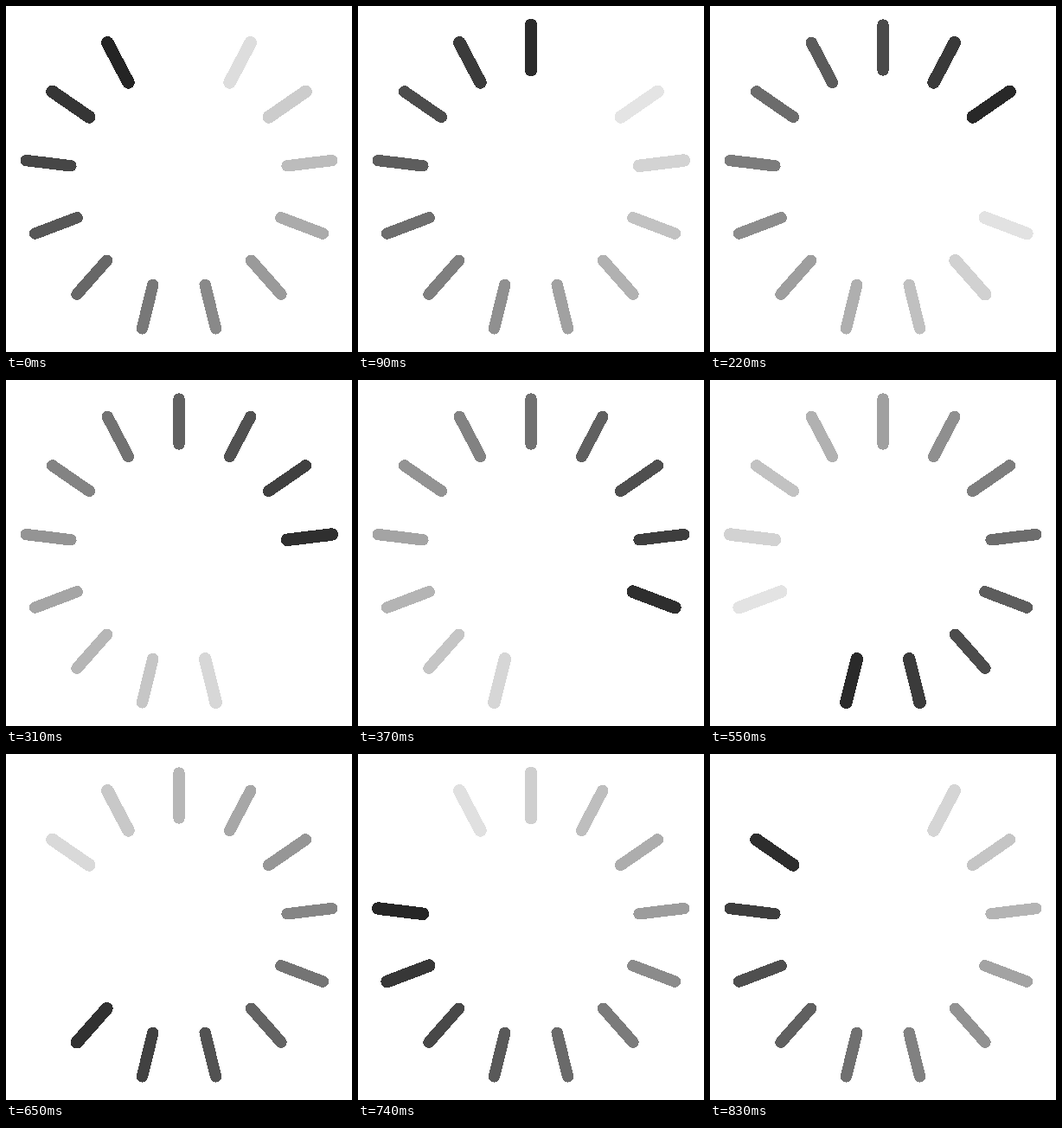
An HTML page that plays this animation: 400x400 px, repeating every 860 ms.

```html
<!DOCTYPE html>
<html lang="en">
<head>
<meta charset="utf-8">
<title>Spinner</title>
<style>
  html, body { margin: 0; width: 100%; height: 100%; overflow: hidden; background: #fff; }
  svg { display: block; width: 100vw; height: 100vh; }
  line { stroke-linecap: round; shape-rendering: crispEdges; }
</style>
</head>
<body>
<svg viewBox="0 0 400 400"></svg>
<script>
const LOOP = 860, STEPS = 28, SPOKES = 13;
const DARK = 36, CUTOFF = 758;
const svg = document.querySelector('svg');

const spokes = Array.from({ length: SPOKES }, (_, k) => {
  const line = document.createElementNS(svg.namespaceURI, 'line');
  const set = { x1: 200, x2: 200, y1: 22, y2: 74, transform: `rotate(${k * 360 / SPOKES} 200 200)` };
  for (const name in set) line.setAttribute(name, set[name]);
  return svg.appendChild(line);
});

// The picture advances in 28 steps, each starting on a whole 10 ms.
function stepTime(t) {
  const tick = Math.floor((t % LOOP) / 10);
  return Math.floor((tick + 0.5) * 10 * STEPS / LOOP) * LOOP / STEPS;
}

// Fresh and faded spokes are slightly heavier.
const weight = grey => grey < 60 || grey > 198 ? 14.6 : 13.4;

function draw() {
  const t = stepTime(performance.now());
  spokes.forEach((line, k) => {
    const start = (k + 1) * LOOP / SPOKES;
    const age = (t - start + LOOP) % LOOP;
    const grey = Math.round(DARK + (255 - DARK) * age / LOOP);
    line.setAttribute('stroke', `rgb(${grey},${grey},${grey})`);
    line.setAttribute('stroke-width', weight(grey));
    line.setAttribute('visibility', age > CUTOFF ? 'hidden' : 'visible');
  });
  requestAnimationFrame(draw);
}
draw();
</script>
</body>
</html>
```
